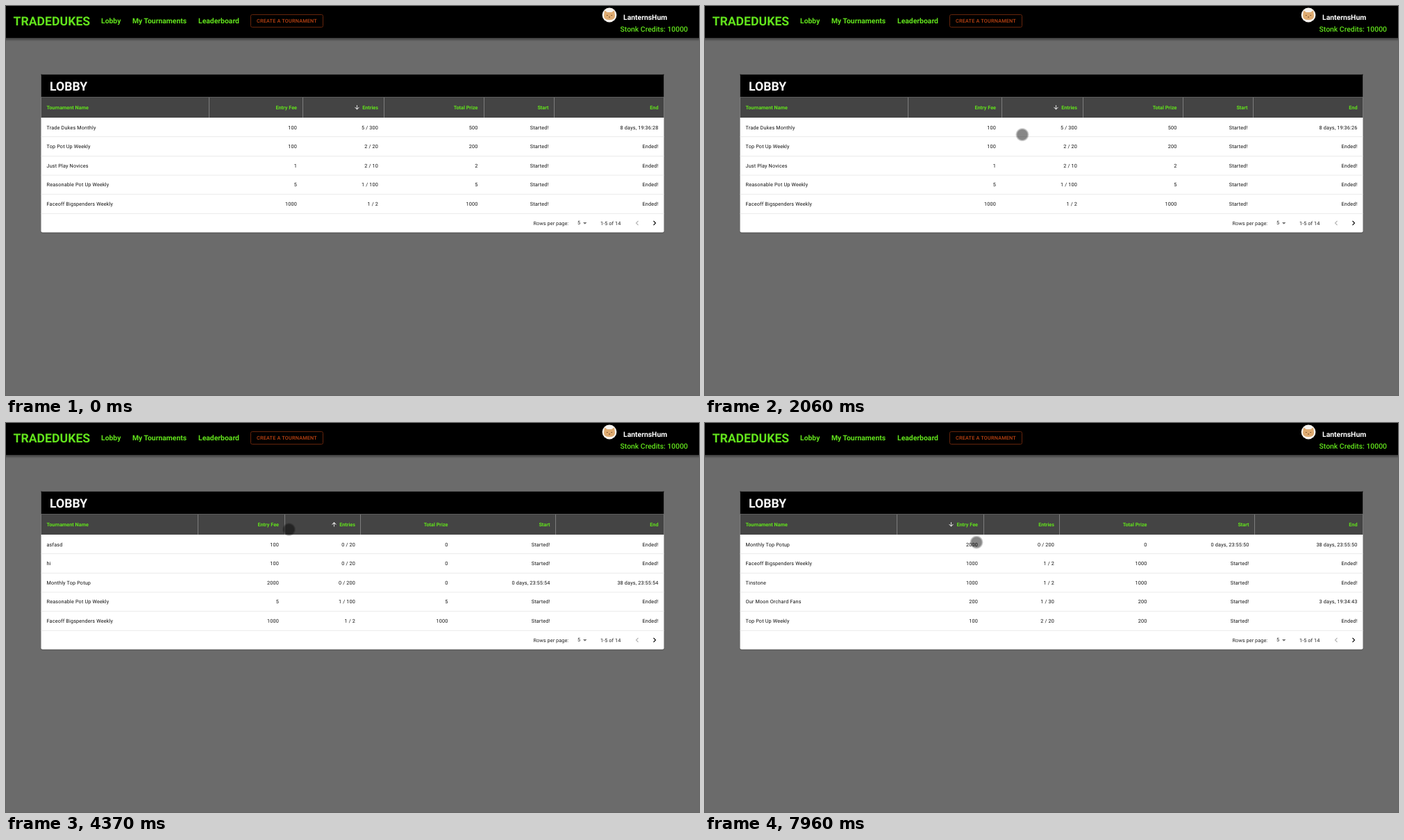
An HTML page for the animation above (7990 ms loop, 998 by 561 pixels).

```html
<!DOCTYPE html>
<html lang="en">
<head>
<meta charset="utf-8">
<title>Lobby</title>
<style>
  html, body { margin: 0; width: 100%; height: 100%; overflow: hidden; background: #6b6b6b; }
  svg { display: block; width: 998px; height: 561px; font: 7.28px Roboto, Arial, sans-serif; text-rendering: geometricPrecision; }
  .green { fill: #62e31c; }
  .nav { font-size: 10.4px; font-weight: 700; }
  .credits { font-size: 10.4px; font-weight: 500; }
  .big { font-size: 17.68px; font-weight: 700; }
  .button { font-weight: 500; letter-spacing: .2px; fill: #bd4312; }
  .head { font-weight: 700; }
  .cell { letter-spacing: .16px; fill: #111; }
  .foot { letter-spacing: .08px; fill: #222; }
  .end { text-anchor: end; }
</style>
</head>
<body>
<svg id="stage" viewBox="0 0 998 561" xmlns="http://www.w3.org/2000/svg">
  <defs>
    <linearGradient id="shade" x2="0" y2="1">
      <stop offset="0" stop-opacity=".45"/><stop offset="1" stop-opacity="0"/>
    </linearGradient>
    <radialGradient id="dark">
      <stop offset=".7" stop-opacity=".47"/><stop offset="1" stop-opacity="0"/>
    </radialGradient>
    <radialGradient id="press">
      <stop offset=".9" stop-color="#e8c800" stop-opacity=".6"/><stop offset="1" stop-color="#e8c800" stop-opacity="0"/>
    </radialGradient>
  </defs>
  <rect width="998" height="561" fill="#6b6b6b"/>
  <rect y="46" width="998" height="5" fill="url(#shade)"/>
  <rect width="998" height="46" fill="#000"/>
  <text class="big green" x="10.5" y="28">TRADEDUKES</text>
  <g class="nav green">
    <text x="137" y="25.2">Lobby</text>
    <text x="182" y="25.2">My Tournaments</text>
    <text x="277" y="25.2">Leaderboard</text>
  </g>
  <rect x="352.5" y="12.5" width="104" height="18" rx="2" fill="none" stroke="#65240b"/>
  <text class="button" x="361" y="24.2">CREATE A TOURNAMENT</text>
  <circle cx="869" cy="13" r="10.4" fill="#f7f3ee"/>
  <path d="M861 14 L862 6.5 L866 9 H872 L876 6.5 L877 14 Q877 20 869 20 Q861 20 861 14Z" fill="#dfab70"/>
  <path d="M865 13.5h1.5M871.5 13.5h1.5M868 16h2" stroke="#6b452b"/>
  <text class="nav" x="889" y="20.2" fill="#fff">LanternsHum</text>
  <text class="credits green end" x="982" y="36.7">Stonk Credits: 10000</text>

  <rect x="50.5" y="99" width="897" height="229" rx="2" fill="#000" opacity=".18"/>
  <rect x="50.5" y="98.5" width="897" height="228" rx="2" fill="#fff"/>
  <rect x="50.5" y="98.5" width="897" height="33" fill="#000"/>
  <rect x="50.5" y="131.5" width="897" height="29.5" fill="#444"/>
  <path d="M50.5 131.5h897" stroke="#5c5c5c" stroke-width=".6"/>
  <text class="big" x="63" y="121.8" fill="#fff">LOBBY</text>
  <path d="M50.5 188.5h897M50.5 216.5h897M50.5 244h897M50.5 271.5h897M50.5 299.5h897" stroke="#e6e6e6" stroke-width=".8"/>
  <path id="seps" fill="none" stroke="#7d7d7d"/>
  <g id="table"></g>
  <g class="foot">
    <text x="759.5" y="315.6">Rows per page:</text>
    <text x="823" y="315.2">5</text>
    <text x="856" y="315.6">1-5 of 14</text>
  </g>
  <path d="M831 312h5.4l-2.7 2.7z" fill="#707070"/>
  <g fill="none" stroke-width="1.1">
    <path d="M910.5 310l-3 3 3 3" stroke="#b4b4b4"/>
    <path d="M932.5 310l3 3-3 3" stroke="#111"/>
  </g>
  <g id="arrows" fill="#fff"></g>
  <circle id="cursor"/>
</svg>
<script>
const LOOP = 7990;
const NS = 'http://www.w3.org/2000/svg';
const $ = id => document.getElementById(id);

function make(parent, tag, attrs, text = '') {
  const el = document.createElementNS(NS, tag);
  for (const k in attrs) el.setAttribute(k, attrs[k]);
  el.textContent = text;
  return parent.appendChild(el);
}

// Right text edges and divider positions for each column fit
const wide = { right: [419, 536, 679.5, 781.5], seps: [292.5, 427.5, 544.5, 688.5, 789.5] };
const timed = { right: [393, 503, 636.5, 783.5], seps: [276.5, 401.5, 510.5, 791.5] };
const tight = { right: [380, 492, 629, 780], seps: [260.5, 388.5, 500.5, 788.5] };
const short = { right: [406, 526, 673, 777.5], seps: [276.5, 414.5, 534.5] };

const T = {
  month: ['Trade Dukes Monthly', 100, '5 / 300', 500],
  top: ['Top Pot Up Weekly', 100, '2 / 20', 200],
  novice: ['Just Play Novices', 1, '2 / 10', 2],
  cheap: ['Reasonable Pot Up Weekly', 5, '1 / 100', 5],
  duel: ['Faceoff Bigspenders Weekly', 1000, '1 / 2', 1000],
  test: ['asfasd', 100, '0 / 20', 0],
  hi: ['hi', 100, '0 / 20', 0],
  large: ['Monthly Top Potup', 2000, '0 / 200', 0],
  finn: ["Finn's tournament", 100, '1 / 20', 100],
  tin: ['Tinstone', 1000, '1 / 2', 1000],
  fans: ['Our Moon Orchard Fans', 200, '1 / 30', 200]
};
const byEntriesDown = [T.month, T.top, T.novice, T.cheap, T.duel];
const byEntriesUp = [T.test, T.hi, T.large, T.cheap, T.duel];
const byFeeUp = [T.novice, T.cheap, T.top, T.month, T.finn];
const byFeeDown = [T.large, T.duel, T.tin, T.fans, T.top];

// Countdowns refresh on ticks, so after a sort they lag behind the rows
const ticks = [310, 1210, 2160, 3120, 4080, 5040, 6000, 6960, 7930];
const phases = [
  { at: 0, fit: wide, rows: byEntriesDown, clocks: byEntriesDown },
  { at: 3210, fit: wide, rows: byEntriesUp, clocks: byEntriesDown },
  { at: 4080, fit: timed, rows: byEntriesUp, clocks: byEntriesUp },
  { at: 5370, fit: tight, rows: byFeeUp, clocks: byEntriesUp },
  { at: 6000, fit: short, rows: byFeeUp, clocks: byFeeUp },
  { at: 6870, fit: wide, rows: byFeeDown, clocks: byFeeUp },
  { at: 6960, fit: timed, rows: byFeeDown, clocks: byFeeDown }
];

function clock(item, n) {
  if (item === T.month) return ['Started!', '8 days, 19:36:' + (28 - n)];
  if (item === T.large) return ['0 days, 23:55:' + (59 - n), '38 days, 23:55:' + (59 - n)];
  if (item === T.fans) return ['Started!', '3 days, 19:34:' + (52 - n)];
  return ['Started!', 'Ended!'];
}

const path = [
  [310, 655, 572], [520, 608, 435], [1210, 608, 435], [1440, 450, 388], [1600, 360, 362],
  [1690, 341, 356], [1790, 345, 315], [1890, 375, 270], [2000, 449, 190], [2300, 488, 168],
  [2560, 521, 153], [2650, 524, 151], [2880, 524, 151], [3030, 514, 146], [4080, 514, 146],
  [4260, 440, 151], [4520, 364, 157], [4750, 364, 157], [4840, 376, 152], [6340, 376, 152],
  [6520, 395, 154.5], [7070, 395, 154.5], [7310, 393, 180], [7900, 393, 180], [7960, 391, 172]
];
const presses = [[3090, 3210], [5270, 5370], [6780, 6870]];

const clamp = v => Math.max(0, Math.min(1, v));
const ease = (t, start) => { const u = clamp((t - start) / 200); return u * u * (3 - 2 * u); };

function cursorAt(t) {
  let i = path.findIndex(p => p[0] > t);
  if (i === 0) return path[0].slice(1);
  if (i < 0) return path[path.length - 1].slice(1);
  const a = path[i - 1], b = path[i], u = (t - a[0]) / (b[0] - a[0]);
  return [a[1] + (b[1] - a[1]) * u, a[2] + (b[2] - a[2]) * u];
}

const rowY = [177.6, 205.2, 233.1, 260.1, 288];
const line = (cls, y, text) => make($('table'), 'text', { class: cls, y, x: 58.5 }, text);
const heads = ['Tournament Name', 'Entry Fee', 'Entries', 'Total Prize', 'Start', 'End']
  .map((name, i) => line('head green' + (i ? ' end' : ''), 148.6, name));
const cells = rowY.map(y => heads.map((_, i) => line('cell' + (i ? ' end' : ''), y, '')));
const icon = 'M20 12l-1.41-1.41L13 16.17V4h-2v12.17l-5.58-5.59L4 12l8 8 8-8z';
const feeArrow = make($('arrows'), 'path', { d: icon });
const entryArrow = make($('arrows'), 'path', { d: icon });

function setArrow(el, x, angle, opacity) {
  el.setAttribute('transform', `translate(${x} 146.3) rotate(${angle}) scale(.4) translate(-12 -12)`);
  el.setAttribute('opacity', opacity);
}

let shown = '';
function drawTable(phase, n) {
  const key = phase.at + ':' + n;
  if (key === shown) return;
  shown = key;
  const edges = [58.5, ...phase.fit.right, 939.5];
  heads.forEach((h, i) => h.setAttribute('x', edges[i]));
  cells.forEach((row, r) => {
    const values = [...phase.rows[r], ...clock(phase.clocks[r], n)];
    row.forEach((c, i) => {
      c.setAttribute('x', edges[i]);
      c.textContent = values[i];
    });
  });
  $('seps').setAttribute('d', phase.fit.seps.map(x => `M${x} 132V161`).join(''));
}

function render(t) {
  const phase = phases.filter(p => p.at <= t).pop();
  drawTable(phase, ticks.filter(k => k <= t).length);

  const [fee, entries] = phase.fit.right;
  const swap = ease(t, 5370);
  setArrow(entryArrow, entries - 30.5, 180 * ease(t, 3210), 1 - swap);
  setArrow(feeArrow, fee - 38.5, 180 * (1 - ease(t, 6870)), swap);

  const [x, y] = cursorAt(t);
  const down = presses.some(([a, b]) => t >= a && t < b);
  const cursor = $('cursor');
  cursor.setAttribute('cx', x);
  cursor.setAttribute('cy', y);
  cursor.setAttribute('r', down ? 10.8 : 10);
  cursor.setAttribute('fill', down ? 'url(#press)' : 'url(#dark)');
}

const start = performance.now();
function frame() {
  render((performance.now() - start) % LOOP);
  requestAnimationFrame(frame);
}
frame();
</script>
</body>
</html>
```
